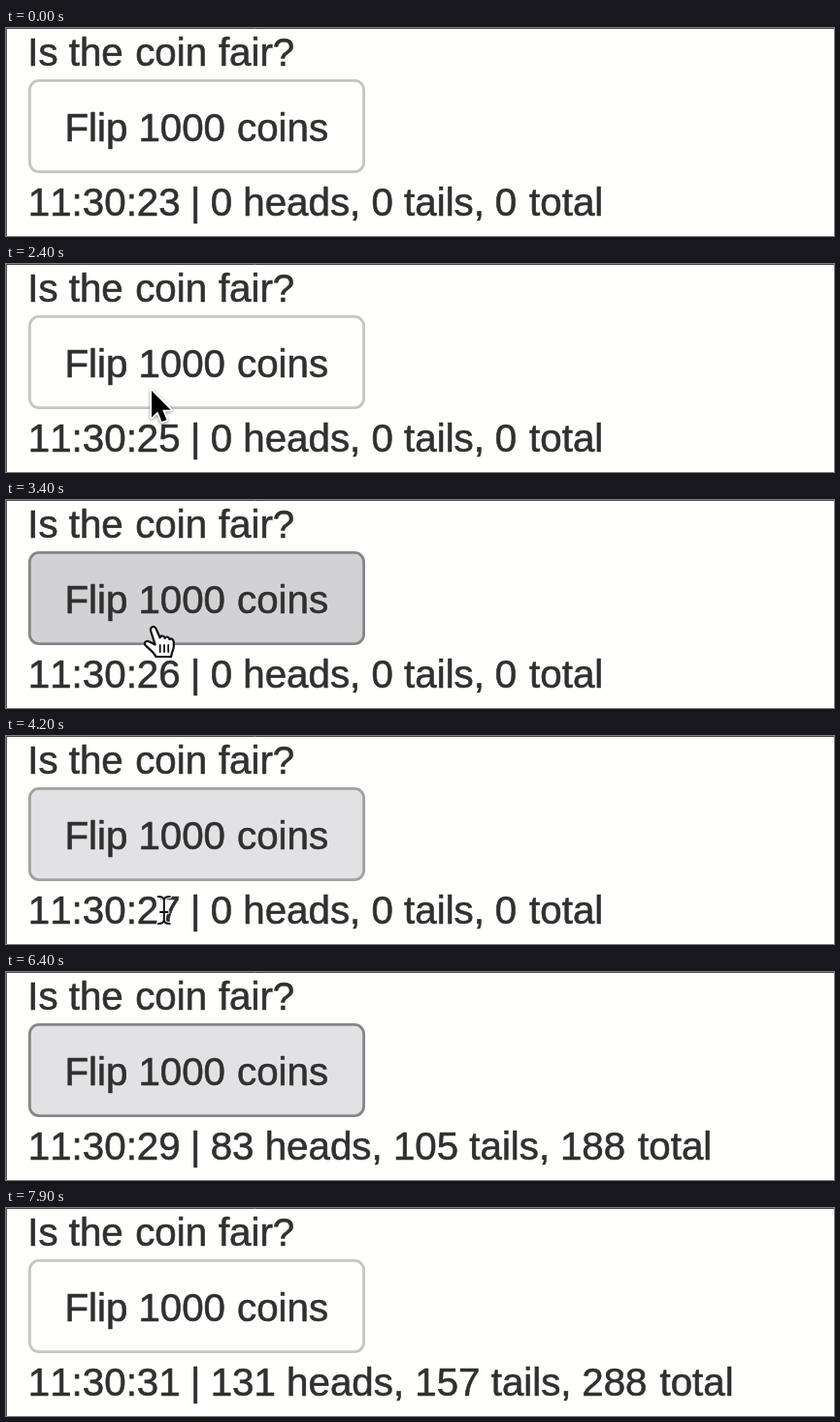
Recreate the animation shown at these times as an HTML page. Size 853x215 px, loop 8000 ms.

```html
<!DOCTYPE html>
<html lang="en">
<head>
<meta charset="utf-8">
<title>Coin flips</title>
<style>
  html, body { margin: 0; width: 100%; height: 100%; overflow: hidden; background: #fefefd; }
  svg { display: block; }
  text {
    font: 40.3px "Liberation Sans", Arial, sans-serif;
    font-kerning: none;
    fill: #303030;
    stroke: #303030;
    stroke-width: .6px;
    white-space: pre;
  }
  #arrow { filter: drop-shadow(0 1px 1.5px rgba(0, 0, 0, .45)); }
</style>
</head>
<body>
<svg width="853" height="215" viewBox="0 0 853 215">
  <rect width="853" height="215" fill="#fefefd"/>
  <path d="M0 .5H853M.5 0V215" stroke="#4c4c4c"/>
  <text y="39"><tspan x="22.2">Is</tspan><tspan x="64.7">the</tspan><tspan x="133.2">coin</tspan><tspan x="218.9">fair?</tspan></text>
  <rect id="button" x="24.4" y="54.4" width="344.2" height="94.2" rx="9.5" stroke-width="2.8"/>
  <text y="116.8"><tspan x="60.4">Flip</tspan><tspan x="136.4">1000</tspan><tspan x="238">coins</tspan></text>
  <text id="status" y="193.6"></text>

  <g id="arrow">
    <path d="M0 0V27.5L6.3 21.6 10.6 32 15.6 30 11.2 19.8H19.6Z" fill="#000" stroke="#fff" stroke-width="3.4" stroke-linejoin="round" paint-order="stroke"/>
  </g>
  <g id="hand" fill="#fff" stroke="#111" stroke-width="2.2" stroke-linejoin="round" stroke-linecap="round">
    <path d="M153.6 149.5L149.2 135.5C148 131.2 152.4 129.2 154.4 132.8L158.6 142.3C159.8 139.6 163 140 163.6 142.8C165.2 140.6 168 141.4 168.4 144C170.6 142.6 172.6 144.2 172.8 147V151.6C172.6 155 170.6 156.8 170.2 162H154.4C153.4 158.4 148.2 154.6 143.8 150.4C141.2 147.6 144.6 144.8 147.8 146.6Z"/>
    <path d="M158.7 150V157M163 150V157M167.2 150V157" stroke-width="1.8"/>
  </g>
  <g id="beam" fill="none" stroke-linecap="round">
    <path id="halo" d="M156.8 166Q162.8 166 162.8 170Q162.8 166 168.8 166M162.8 169V190M156.8 194Q162.8 194 162.8 190Q162.8 194 168.8 194M159 182H166.6" stroke="#fff" stroke-width="4"/>
  </g>
</svg>
<script>
const LOOP = 8000, EM = 40.3;
const $ = id => document.getElementById(id);

// the dark core of the text cursor repeats its halo, thinner
const ink = $("halo").cloneNode();
ink.removeAttribute("id");
ink.setAttribute("stroke", "#111");
ink.setAttribute("stroke-width", "2");
$("beam").append(ink);

const ticks = [700, 1700, 2700, 3700, 4800, 5800, 6900, 7900];
const flips = [
  [0, 0, 0], [4800, 14, 23], [5300, 37, 50], [5800, 60, 78],
  [6400, 83, 105], [6900, 107, 131], [7400, 131, 157]
];
const looks = {
  plain: ["#fefefd", "#c5c5c5"],
  hover: ["#e2e2e4", "#a1a1a1"],
  press: ["#d2d2d4", "#868686"],
  focus: ["#e2e2e4", "#868686"]
};
const buttonSteps = [[0, "plain"], [3000, "hover"], [3300, "press"], [3500, "hover"], [4300, "focus"], [7600, "plain"]];
const cursorSteps = [[0, ""], [2100, "arrow"], [3000, "hand"], [4200, "beam"], [4300, ""]];
const arrowPath = [[2100, 142, 203], [2200, 144, 170], [2300, 148, 141], [2400, 150, 131]];

const at = (steps, t) => steps.filter(s => s[0] <= t).pop() || steps[0];

function statusLine(t) {
  const clock = "11:30:" + (23 + ticks.filter(k => k <= t).length);
  const [, heads, tails] = at(flips, t);
  const parts = [[22.8, clock], [190, "|"]];
  let x = 210.7;
  const put = (word, width) => {
    parts.push([x, word]);
    x += (width + 0.278) * EM;
  };
  const count = n => put(String(n), String(n).length * 0.556);
  count(heads);
  put("heads,", 3.001);
  count(tails);
  put("tails,", 2.045);
  count(heads + tails);
  x += 1.8;
  put("total", 1.96);
  return parts.map(([px, s]) => `<tspan x="${px.toFixed(1)}">${s}</tspan>`).join("");
}

let shown = "";
function draw(t) {
  const line = statusLine(t);
  if (line !== shown) $("status").innerHTML = shown = line;

  const [fill, edge] = looks[at(buttonSteps, t)[1]];
  $("button").setAttribute("fill", fill);
  $("button").setAttribute("stroke", edge);

  const cursor = at(cursorSteps, t)[1];
  for (const id of ["arrow", "hand", "beam"])
    $(id).setAttribute("visibility", id === cursor ? "visible" : "hidden");
  const [, x, y] = at(arrowPath, t);
  $("arrow").setAttribute("transform", `translate(${x} ${y})`);
}

const start = performance.now();
function frame() {
  draw((performance.now() - start) % LOOP);
  requestAnimationFrame(frame);
}
frame();
</script>
</body>
</html>
```
